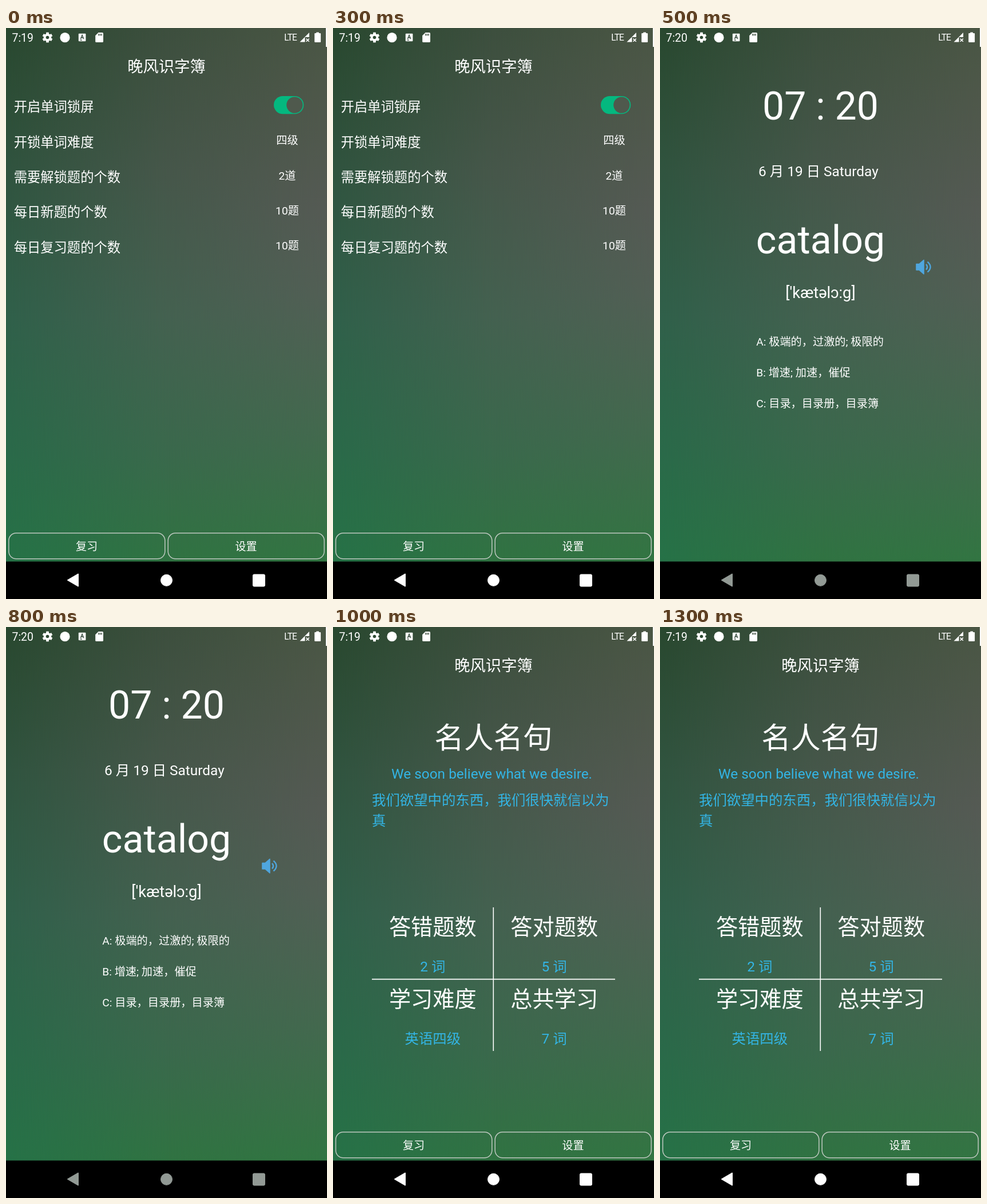
Write an HTML page that moves like this. It is 561 px wide and 998 px high and loops after 1500 ms.

```html
<!DOCTYPE html>
<html lang="zh-CN">
<head>
<meta charset="utf-8">
<title>Word lock screen</title>
<style>
html, body { margin: 0; width: 100%; height: 100%; overflow: hidden; background: #000; }
#stage { position: relative; width: 561px; height: 998px; overflow: hidden; }
.wash { position: absolute; left: 0; top: 0; width: 561px; height: 933px; }
.west { background: linear-gradient(#29482f, #30543f 27%, #30604a 54%, #2a6a49 80%, #267247); }
.mid {
  background: linear-gradient(#3d4f3e, #46574a 27%, #446150 54%, #3a694c 80%, #307342);
  -webkit-mask-image: linear-gradient(90deg, transparent, #000 50%);
  mask-image: linear-gradient(90deg, transparent, #000 50%);
}
.east {
  background: linear-gradient(#4a5644, #555a54 34%, #525f55 50%, #43694e 76%, #327542);
  -webkit-mask-image: linear-gradient(90deg, transparent 50%, #000);
  mask-image: linear-gradient(90deg, transparent 50%, #000);
}
svg { position: absolute; left: 0; top: 0; }
text { font-family: Roboto, "Noto Sans CJK SC", "Noto Sans CJK", "Noto Sans", sans-serif; white-space: pre; }
</style>
</head>
<body>
<div id="stage">
  <div class="wash west"></div>
  <div class="wash mid"></div>
  <div class="wash east"></div>
  <svg width="561" height="998" viewBox="0 0 561 998" fill="#fff">
    <defs>
      <g id="nav">
        <path d="M108 965L126 954.5V975.5Z" stroke="inherit" stroke-width="2" stroke-linejoin="round"/>
        <circle cx="280.5" cy="965.3" r="10"/>
        <rect x="431.5" y="955" width="21" height="21" rx="2"/>
      </g>
    </defs>
    <rect y="932.5" width="561" height="66" fill="#000"/>
    <rect x="559" width="2" height="33"/>

    <!-- status bar -->
    <g id="status">
      <circle cx="72.5" cy="16.5" r="4.8" fill="none" stroke="#fff" stroke-width="4"/>
      <g id="teeth" stroke="#fff" stroke-width="4.6"></g>
      <circle cx="103" cy="16.7" r="8.6"/>
      <rect x="126.8" y="9.8" width="12.6" height="13.4" rx="1"/>
      <path d="M130.3 19.2L133.1 12.3L135.9 19.2M131.3 17H134.9M129.5 21.2H133" fill="none" stroke="#33483a" stroke-width="1.3"/>
      <path d="M161.5 8H168.4Q170 8 170 9.6V23.4Q170 25 168.4 25H157.8Q156.2 25 156.2 23.4V13.3Z"/>
      <path d="M161.9 10V13.6M164.5 10V13.6M167.1 10V13.6" stroke="#3b4c3e" stroke-width="1.4"/>
      <path d="M513.5 24.5L530 8V16H522.5V24.5Z"/>
      <path d="M524.6 18.6L529.8 23.8M529.8 18.6L524.6 23.8" stroke="#fff" stroke-width="1.6"/>
      <path d="M542.3 7.4H546.9V9H549Q550.1 9 550.1 10.1V23.9Q550.1 25 549 25H540.3Q539.2 25 539.2 23.9V10.1Q539.2 9 540.3 9H542.3Z"/>
    </g>

    <g id="home" data-on="02">
      <use href="#nav" stroke="#fff"/>
      <g fill="none" stroke="#bdc8bf" stroke-width="1.5">
        <rect x="4.8" y="882.8" width="273" height="45" rx="13"/>
        <rect x="283.2" y="882.8" width="273" height="45" rx="13"/>
      </g>
    </g>

    <g id="prefs" data-on="0">
      <rect x="468" y="119" width="52.3" height="31.2" rx="15.6" fill="#04b87f"/>
      <circle cx="504.4" cy="134.6" r="14.2" fill="#4f594d"/>
    </g>

    <g id="lock" data-on="1">
      <use href="#nav" fill="#929a95" stroke="#929a95"/>
      <g fill="#4fa6de" stroke="#4fa6de">
        <path d="M448 412.5H453L461 405.5V430L453 423H448Z" stroke-width="1.6" stroke-linejoin="round"/>
        <path d="M465 413Q469.2 417.7 465 422.4M467.5 408.7Q477.6 417.7 467.5 426.7" fill="none" stroke-width="2.4"/>
      </g>
    </g>

    <g id="stats" data-on="2">
      <path d="M280.3 490V741M68 615.6H493" stroke="#fff" stroke-width="1.6"/>
    </g>
  </svg>
</div>
<script>
const NS = "http://www.w3.org/2000/svg";
const BLUE = "#33b5e5";
const STEP = 500, LOOP = 1500;
const get = id => document.getElementById(id);

function add(parent, tag, attrs) {
  const el = document.createElementNS(NS, tag);
  for (const key in attrs) el.setAttribute(key, attrs[key]);
  parent.appendChild(el);
  return el;
}

function write(group, str, x, y, size, extra) {
  const el = add(get(group), "text", { x, y, "font-size": size, ...extra });
  el.textContent = str;
  return el;
}

const center = (group, str, x, y, size, fill = "#fff") =>
  write(group, str, x, y, size, { "text-anchor": "middle", fill });

for (let a = 0; a < 360; a += 60)
  add(get("teeth"), "path", { d: "M72.5 11.5V7.6", transform: `rotate(${a} 72.5 16.5)` });

write("status", "7:19", 10.5, 24, 19.4, { "data-on": "02" });
write("status", "7:20", 10.5, 24, 19.4, { "data-on": "1" });
write("status", "LTE", 486.3, 22, 15.6, { "letter-spacing": -0.9 });

center("home", "晚风识字簿", 280.5, 77.2, 27.3);
center("home", "复习", 141, 913, 19.1);
center("home", "设置", 419.5, 913, 19.1);

const rows = [
  ["开启单词锁屏"],
  ["开锁单词难度", "四级"],
  ["需要解锁题的个数", "2道"],
  ["每日新题的个数", "10题"],
  ["每日复习题的个数", "10题"],
];
rows.forEach(([label, value], i) => {
  const y = 146.3 + 61.3 * i;
  write("prefs", label, 13.7, y, 23.3);
  if (value) center("prefs", value, 491.5, y - 4.3, 19.2);
});

center("lock", "07 : 20", 280.5, 159.5, 68);
write("lock", "6 月 19 日 Saturday", 172, 259, 24.4);
center("lock", "catalog", 280.5, 393.5, 68);
center("lock", "['kætəlɔ:g]", 280.5, 472, 27.3);
["A: 极端的，过激的; 极限的", "B: 增速; 加速，催促", "C: 目录，目录册，目录簿"]
  .forEach((str, i) => write("lock", str, 168.3, 555 + 54 * i, 19.2));

center("stats", "名人名句", 280.5, 211.5, 51.6);
center("stats", "We soon believe what we desire.", 277.5, 265, 24.4, BLUE);
write("stats", "我们欲望中的东西，我们很快就信以为", 68, 311, 24.4, { fill: BLUE });
write("stats", "真", 68, 347, 24.4, { fill: BLUE });
[
  ["答错题数", "2 词", 174.3, 538.3],
  ["答对题数", "5 词", 386.7, 538.3],
  ["学习难度", "英语四级", 174.3, 664.2],
  ["总共学习", "7 词", 386.7, 664.2],
].forEach(([name, value, x, y]) => {
  center("stats", name, x, y, 38.2);
  center("stats", value, x, y + 64, 24.4, BLUE);
});

// Each part lists the scenes in which it is visible.
const parts = document.querySelectorAll("[data-on]");
const start = performance.now();
let shown = -1;

function draw() {
  const time = Math.max(0, performance.now() - start) % LOOP;
  const scene = Math.floor(time / STEP);
  if (scene !== shown) {
    shown = scene;
    parts.forEach(el => {
      el.style.display = el.dataset.on.includes(scene) ? "" : "none";
    });
  }
  requestAnimationFrame(draw);
}
draw();
</script>
</body>
</html>
```
